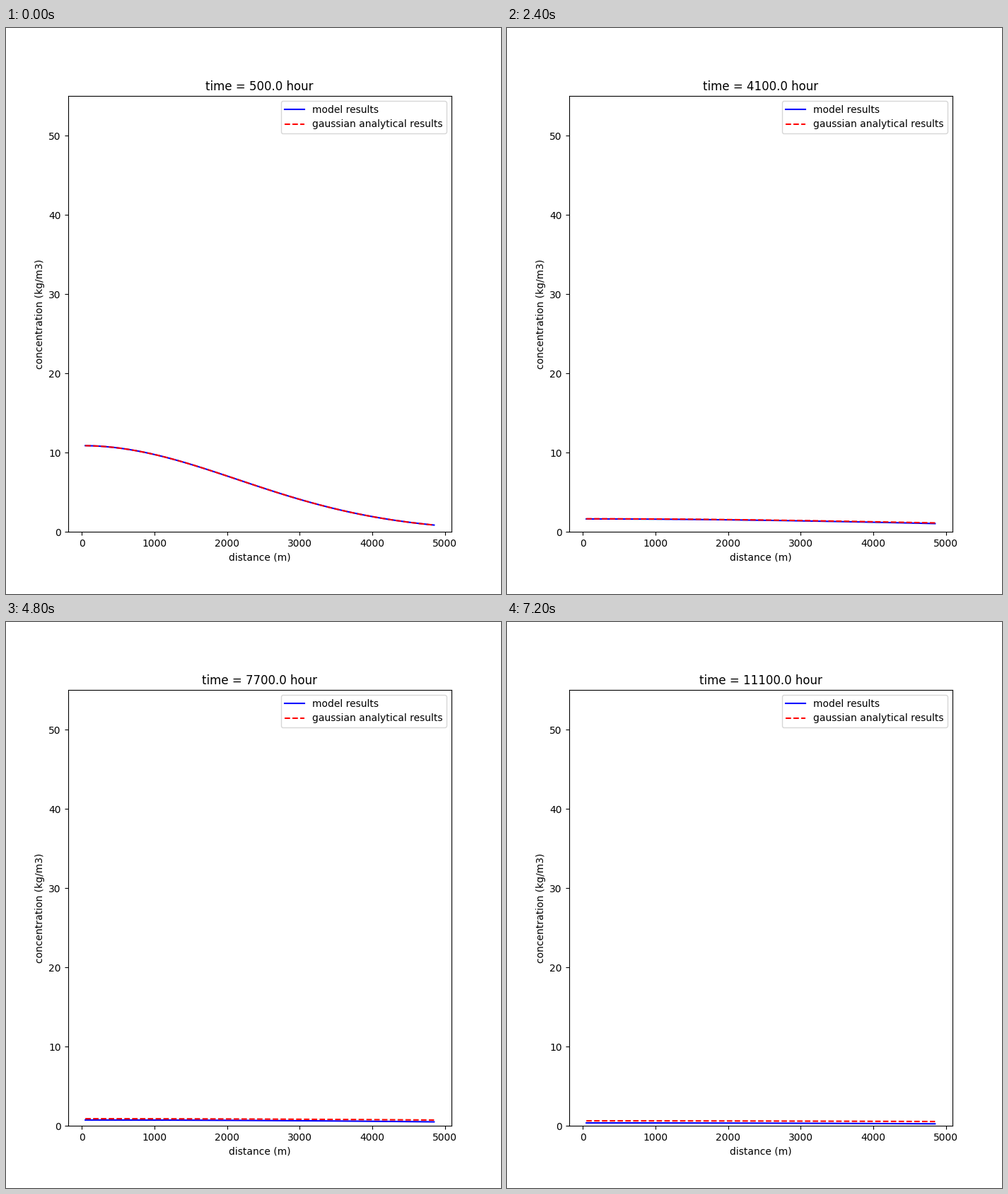
Write a matplotlib script that moves like this. It is 700 px wide and 800 px high and loops after 7600 ms.

```python
import numpy as np
import matplotlib.pyplot as plt
from matplotlib.animation import FuncAnimation

PEAK = 50.0          # initial concentration at the centre, kg/m3
SPREAD = 1000.0      # initial standard deviation, m
DIFFUSIVITY = 1.0    # m2/s
EDGE = 9250.0        # effective absorbing boundary of the model, m

START, STEP, END = 500.0, 600.0, 11100.0   # hours
FRAMES, INTERVAL = 19, 400

x = np.arange(50, 4851, 100)


def variance(hours):
    return SPREAD**2 + 2 * DIFFUSIVITY * hours * 3600


def bell(pos, var):
    return np.exp(-pos**2 / (2 * var))


def bounded_bell(pos, var):
    """Gaussian with alternating mirror images, zero at +-EDGE."""
    return sum((-1)**k * bell(pos - 2 * k * EDGE, var) for k in range(-4, 5))


def analytical(hours):
    var = variance(hours)
    return PEAK * SPREAD**2 / var * bell(x, var)


def model(hours):
    var = variance(hours)
    return PEAK * SPREAD**2 / var * bounded_bell(x, var) * bounded_bell(0.0, var)


fig, ax = plt.subplots(figsize=(7, 8), dpi=100)
model_line, = ax.plot(x, model(START), "b-", label="model results")
exact_line, = ax.plot(x, analytical(START), "r--",
                      label="gaussian analytical results")
ax.set_ylim(0, 55)
ax.set_xlabel("distance (m)")
ax.set_ylabel("concentration (kg/m3)")
ax.legend(loc="upper right")
title = ax.set_title("")


def update(frame):
    hours = min(START + STEP * frame, END)
    model_line.set_ydata(model(hours))
    exact_line.set_ydata(analytical(hours))
    title.set_text(f"time = {hours:.1f} hour")
    return model_line, exact_line, title


anim = FuncAnimation(fig, update, frames=FRAMES, interval=INTERVAL,
                     repeat=True, repeat_delay=0)
plt.show()
```
